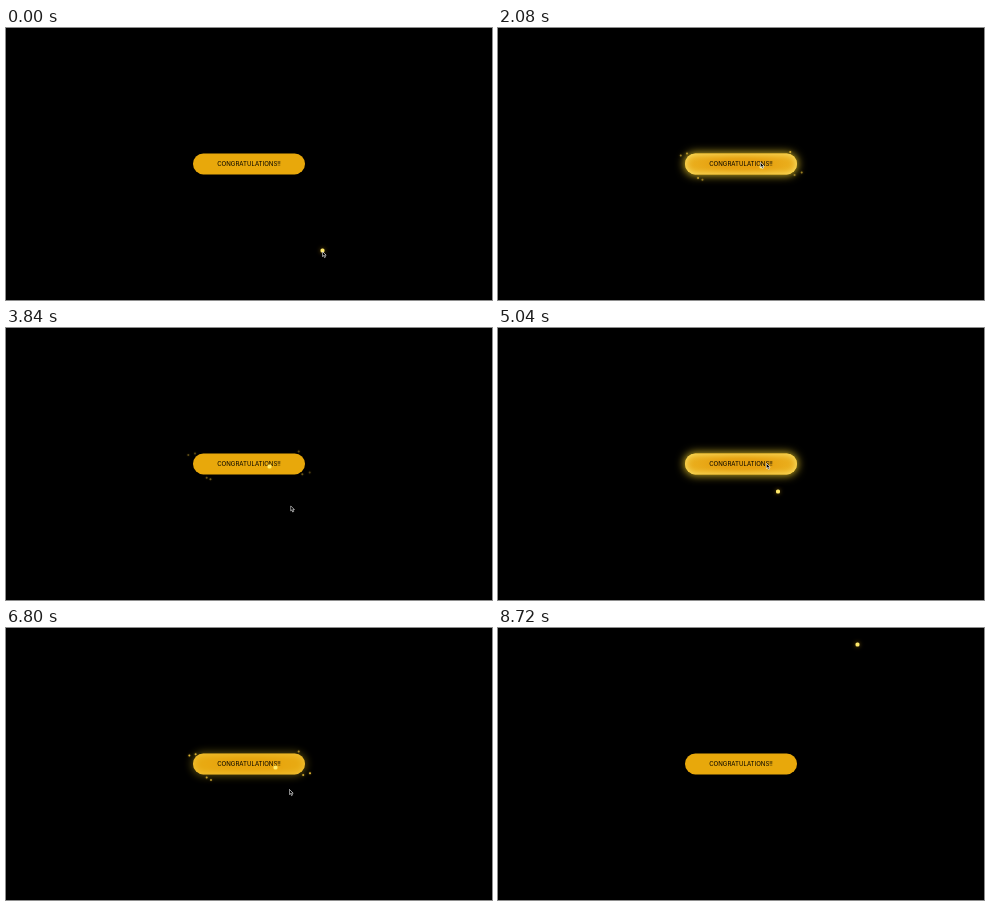
Write an HTML page that moves like this. It is 486 by 272 pixels and loops after 8800 ms.

```html
<!DOCTYPE html>
<html lang="en">
<head>
<meta charset="utf-8">
<title>Glowing button</title>
<style>
  html, body { margin: 0; width: 100%; height: 100%; overflow: hidden; background: #000; }
  #stage { position: relative; width: 486px; height: 272px; overflow: hidden; background: #000; }
  .button, .glow, .label { position: absolute; left: 187px; top: 125px; width: 112px; height: 21px; }
  .button, .glow { height: 20.7px; border-radius: 10.4px; transform: translateY(.4px); }
  .button { background: #e8a80b; }
  .glow {
    background: radial-gradient(ellipse 60% 75%, #e6a00e 35%, #edb828 100%);
    box-shadow: 0 0 8px 1px rgba(255, 220, 45, .8), inset 0 0 7px rgba(255, 240, 130, .85);
  }
  .label {
    font: 400 6.1px/21px Inter, Arial, sans-serif;
    text-align: center; white-space: nowrap; color: #000;
  }
  .spark, .dot, .cursor { position: absolute; left: 0; top: 0; }
  .spark {
    width: 2.4px; height: 2.4px; margin: -1.2px; border-radius: 50%;
    background: #e0b534; box-shadow: 0 0 2px rgba(220, 180, 40, .6);
  }
  .dot {
    width: 3.2px; height: 3.2px; margin: -1.6px; border-radius: 50%;
    background: #ffe96a; box-shadow: 0 0 4px rgba(255, 190, 20, .5);
  }
</style>
</head>
<body>
<div id="stage">
  <div class="button"></div>
  <div class="glow"></div>
  <div class="label">CONGRATULATIONS!!</div>
  <div class="sparks"></div>
  <div class="dot"></div>
  <svg class="cursor" width="6" height="8" viewBox="0 0 6 8">
    <path d="M.4 .4V5.5L1.6 4.5L2.5 6.6L3.5 6.1L2.6 4.2H4.2Z" fill="#000" stroke="#fff" stroke-width=".6"/>
  </svg>
</div>
<script>
  const LOOP = 8800, STEP = 80, LAG = 640, EXIT = 7520;
  const STALL = { from: 240, to: 960 };
  const hovers = [{ on: 640, off: 3040 }, { on: 4500, off: 6640 }];

  // Pointer path: time, x, y. The dot runs along it LAG later.
  const path = [[-LAG, 315, 218], [0, 316, 223], [240, 229, 135], [320, 262, 134],
    [3300, 262, 134], [3600, 277, 169], [4000, 289, 183], [4800, 268, 135],
    [6640, 268, 135], [6800, 283, 161], [7040, 304, 96], [7600, 341, 38], [8080, 358, 12]];

  const homes = [[183, 127], [189, 126], [292, 123.5], [297, 146.5],
    [303.5, 145], [200, 149.5], [205, 151.5]];

  const $ = s => document.querySelector(s);
  const glow = $('.glow'), sparks = $('.sparks'), dot = $('.dot'), cursor = $('.cursor');
  homes.forEach(() => {
    sparks.append(Object.assign(document.createElement('div'), { className: 'spark' }));
  });

  const ramp = (t, start, length) => Math.min(1, Math.max(0, (t - start) / length));

  // Fades in after each hover starts and out after it ends.
  const envelope = (t, inDelay, inTime, outDelay, outTime) =>
    Math.max(...hovers.map(({ on, off }) =>
      Math.min(ramp(t, on + inDelay, inTime), 1 - ramp(t, off + outDelay, outTime))));

  function along(t) {
    const next = path.findIndex(([time]) => time > t);
    if (next < 0) return path.at(-1).slice(1);
    const [t0, x0, y0] = path[next - 1], [t1, x1, y1] = path[next];
    const k = (t - t0) / (t1 - t0);
    return [x0 + (x1 - x0) * k, y0 + (y1 - y0) * k];
  }

  function place(el, x, y) {
    el.style.transform = `translate(${x}px, ${y}px)`;
  }

  function draw() {
    let t = Math.floor(performance.now() % LOOP / STEP) * STEP;
    if (t > STALL.from && t < STALL.to) t = STALL.from;

    place(cursor, ...along(t));
    cursor.style.opacity = t < EXIT ? 1 : 0;
    const [x, y] = along(t - LAG);
    place(dot, x + 1.5, y + 4.5);

    glow.style.opacity = envelope(t, 0, 300, 0, 300);
    sparks.style.opacity = envelope(t, 700, 600, 300, 1000);
    homes.forEach(([hx, hy], i) => {
      const phase = t / LOOP * 2 * Math.PI * (4 + i % 3) + i * 2;
      const spark = sparks.children[i];
      place(spark, hx + Math.sin(phase) * .7, hy + Math.cos(phase) * .5);
      spark.style.opacity = .8 + .2 * Math.sin(phase * 2);
    });
    requestAnimationFrame(draw);
  }
  draw();
</script>
</body>
</html>
```
